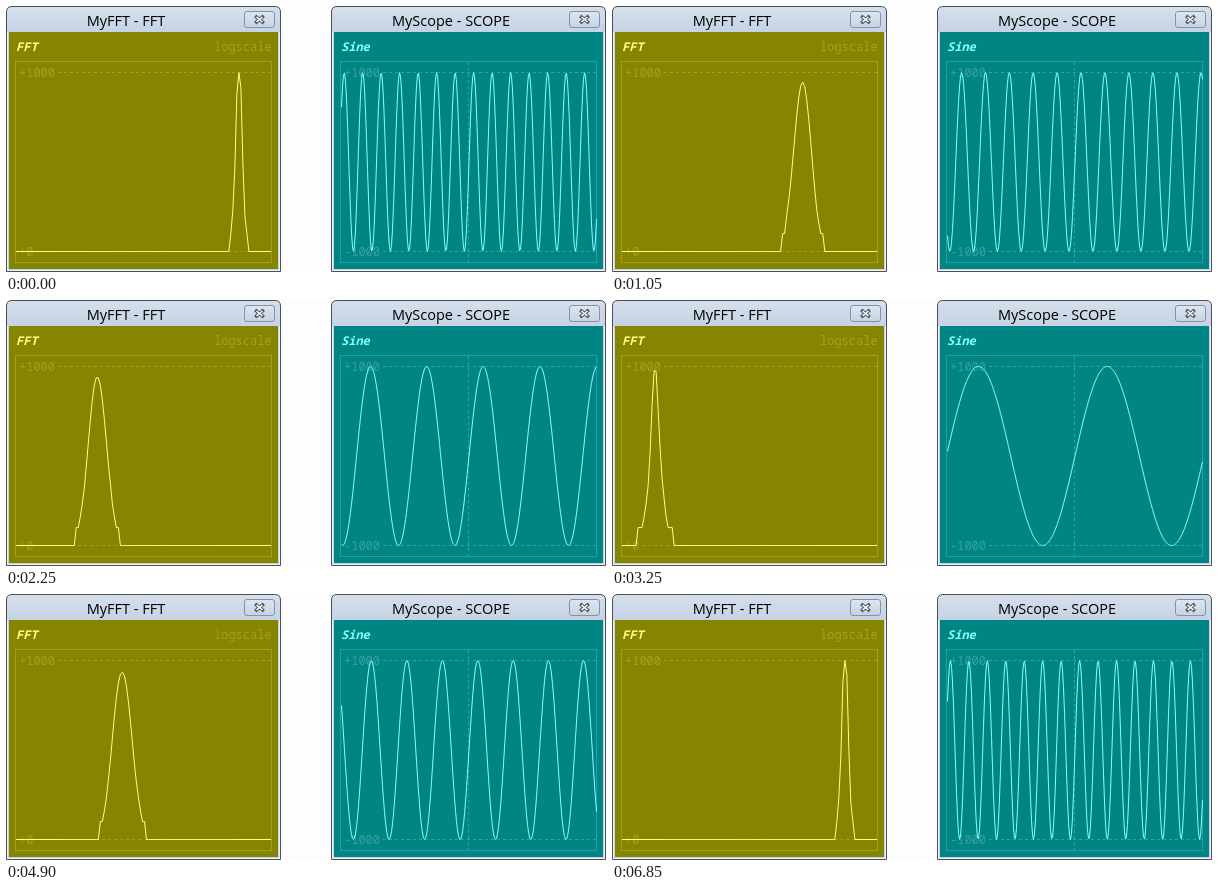
Recreate the animation shown at these times as an HTML page. Size 600 by 266 pixels, loop 6900 ms.

```html
<!DOCTYPE html>
<html lang="en">
<head>
<meta charset="utf-8">
<title>FFT and scope</title>
<style>
  html, body { margin: 0; width: 100%; height: 100%; overflow: hidden; background: #fdfdfd; }
  svg { display: block; width: 600px; height: 266px; }
  .title { font: 14.5px "Open Sans", "Noto Sans", sans-serif; text-anchor: middle; fill: #000; }
  .mono { font: 12px "Noto Sans Mono", "DejaVu Sans Mono", monospace; }
  .name { font-weight: bold; font-style: italic; }
  .trace { fill: none; stroke-width: 1; stroke-linejoin: round; }
</style>
</head>
<body>
<svg id="stage" viewBox="0 0 600 266"></svg>
<script>
const LOOP = 6900, STEP = 50, TAU = 2 * Math.PI;
const TOP = 66.5, BASE = 245.5, SPAN = BASE - TOP;

// Swept sine, in cycles per sample; PERIOD is one whole sweep in samples
const MID = 1550 / 50000, SWING = 1163 / 50000, PERIOD = 62000;
const WINDOW = 2048, STRIDE = 4, BINS = 128;
const LEAD = 1050 / PERIOD * TAU;   // scope shows newer samples than the FFT window centre

const dash = (x1, y1, x2, y2, color) =>
  `<path d="M${x1} ${y1}L${x2} ${y2}" stroke="${color}" stroke-dasharray="3 3"/>`;

function panel(x, w) {
  const label = (lx, y, text) =>
    `<text class="mono" x="${lx}" y="${y}" fill="${w.dim}">${text}</text>`;
  const cross = "M250.5 11l6 5m0-5l-6 5";
  return `<g transform="translate(${x})">
    <path d="M.5 265.5V6Q.5.5 6 .5H269Q274.5.5 274.5 6V265.5Z" fill="url(#bar)" stroke="#4b5058"/>
    <path d="M1.5 264.5V26M273.5 264.5V26M1 264.5H274" stroke="#eef3f8"/>
    <rect x="3" y="26" width="269" height="237" fill="${w.back}"/>
    <text class="title" x="120" y="19.5">${w.title}</text>
    <rect x="238.5" y="5.5" width="30" height="16" rx="2.5" fill="url(#button)" stroke="#8592a5"/>
    <path d="${cross}" stroke="#505764" stroke-width="3.4" stroke-linecap="square"/>
    <path d="${cross}" stroke="#fff" stroke-width="1.6"/>
    <text class="mono name" x="10" y="45" fill="${w.ink}">${w.name}</text>
    ${label(208, 45, w.note)}
    <rect x="9.5" y="55.5" width="256" height="201" fill="none" stroke="${w.frame}"/>
    ${label(13, 71, "+1000")}${label(13, 250, w.low)}
    ${dash(52, TOP, 265, TOP, w.dim)}
    ${dash(13 + 7.2 * w.low.length + 3, BASE, 265, BASE, w.dim)}
    ${w.center ? dash(137.5, 56, 137.5, 256, w.dim) : ""}
    <polyline class="trace" id="${w.id}" stroke="${w.ink}"/>
  </g>`;
}

const gradient = (id, from, to, end) => `<linearGradient id="${id}" x2="0" y2="1">
  <stop stop-color="${from}"/><stop offset="${end}" stop-color="${to}"/></linearGradient>`;

document.getElementById("stage").innerHTML =
  `<defs>${gradient("bar", "#d6e0ec", "#c4d2e4", 0.1)}${gradient("button", "#dde6f0", "#c6d3e3", 1)}</defs>` +
  panel(0, { id: "fft", title: "MyFFT - FFT", name: "FFT", note: "logscale", low: "+0",
    back: "#858500", dim: "#a2a21e", frame: "#a0a01c", ink: "#ffff88" }) +
  panel(325, { id: "scope", title: "MyScope - SCOPE", name: "Sine", note: "", low: "-1000",
    back: "#008585", dim: "#36a2a2", frame: "#269e9e", ink: "#88ffff", center: true });

const fftLine = document.getElementById("fft");
const scopeLine = document.getElementById("scope");

// Signal u samples away from a rising zero crossing at sweep angle a
const signal = (a, u) => Math.sin(TAU * MID * u +
  SWING * PERIOD * (Math.sin(a + TAU * u / PERIOD) - Math.sin(a)));

const points = (count, x, y) =>
  Array.from({ length: count }, (_, i) => `${x(i).toFixed(2)},${y(i).toFixed(2)}`).join(" ");

function spectrum(a) {
  const n = WINDOW / STRIDE;
  const samples = Array.from({ length: n }, (_, i) =>
    (1 - Math.cos(TAU * i / n)) * signal(a, (i - n / 2) * STRIDE));
  return Array.from({ length: BINS }, (_, bin) => {
    let re = 0, im = 0;
    samples.forEach((s, i) => {
      const p = TAU * bin * i / n;
      re += s * Math.cos(p);
      im += s * Math.sin(p);
    });
    return Math.round(2000 / n * Math.hypot(re, im));
  });
}

function draw(t) {
  const a = TAU * (t + 28) / LOOP;
  const power = spectrum(a);
  fftLine.setAttribute("points", points(BINS, i => 10 + i * 255 / (BINS - 1),
    i => BASE - SPAN * Math.log(power[i] + 1) / Math.log(1001)));
  scopeLine.setAttribute("points", points(256, i => 10.5 + i,
    i => (TOP + BASE) / 2 - SPAN / 2 * signal(a + LEAD, i - 127.5)));
}

const start = performance.now();
let shown = -1;
function tick() {
  const t = Math.floor((performance.now() - start) % LOOP / STEP) * STEP;
  if (t !== shown) draw(shown = t);
  requestAnimationFrame(tick);
}
tick();
</script>
</body>
</html>
```
